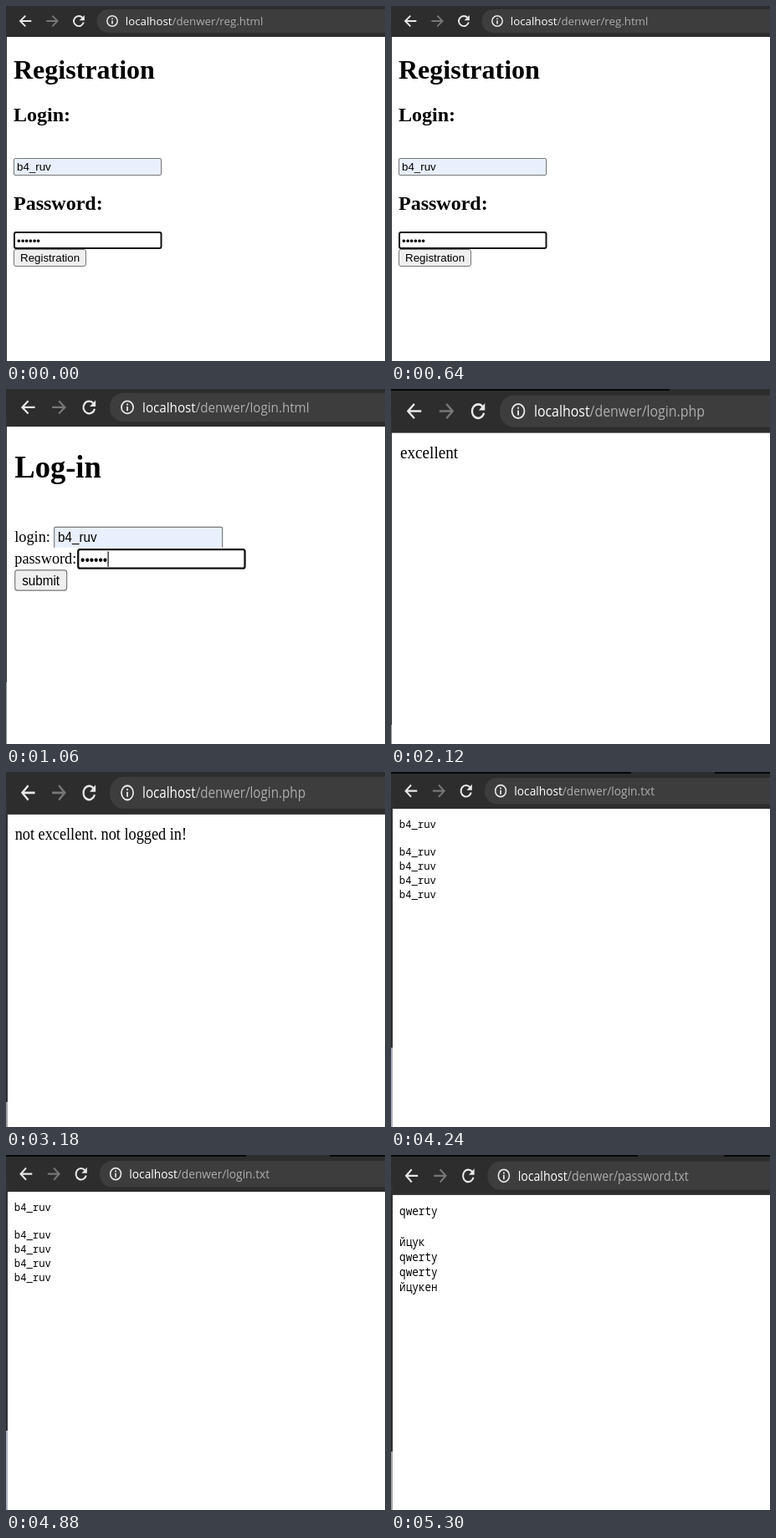
These frames come from a looping animation (453 by 425 pixels, 6.36 s). An HTML page:

```html
<!DOCTYPE html>
<html lang="en">
<head>
<meta charset="utf-8">
<title>Registration and log-in</title>
<style>
  html, body { margin: 0; width: 100%; height: 100%; overflow: hidden; background: #fff; }
  svg { display: block; width: 453px; height: 425px; }
  text { white-space: pre; }
  .url { font: 13.3px "Open Sans", sans-serif; fill: #adadad; }
  .host { fill: #fff; }
  .body { font: 16px "Liberation Serif", serif; }
  .h1 { font: bold 32px "Liberation Serif", serif; }
  .h2 { font: bold 24px "Liberation Serif", serif; }
  .ui { font: 13.33px "Liberation Sans", sans-serif; }
  .mono { font: 11.9px "Noto Sans Mono", monospace; }
  .icon { fill: none; stroke: #e8e8e8; stroke-width: 1.9; }
  .field { fill: #e8f0fe; stroke: #767676; }
  .focus { fill: #fff; stroke: #101010; stroke-width: 2; }
  .button { fill: #efefef; stroke: #767676; }
</style>
</head>
<body>
<svg id="stage" viewBox="0 0 453 425"></svg>
<script>
const HOLD = 1060;
const USER = "b4_ruv";
const DOTS = "••••••";
const BAR = "#2d2d2d";

const text = (kind, x, y, content) =>
  `<text class="${kind}" x="${x}" y="${y}">${content}</text>`;

const box = (kind, x, y, w, h, r) =>
  `<rect class="${kind}" x="${x}" y="${y}" width="${w}" height="${h}" rx="${r}"/>`;

const rect = (x, y, w, h, fill) =>
  `<rect x="${x}" y="${y}" width="${w}" height="${h}" fill="${fill}"/>`;

const lines = (list) =>
  list.map((line, i) => text("mono", 9.5, 57.2 + i * 15, line)).join("");

const toolbar = (path) => `
  ${rect(0, -10, 460, 47, BAR)}
  <rect x="108.5" y="4" width="400" height="28" rx="14" fill="#3d3d3d"/>
  <path class="icon" d="M30.3 18H17.3M23.3 11.7L17 18L23.3 24.3"/>
  <path class="icon" style="stroke:#777" d="M48.3 18H61.3M55.3 11.7L61.6 18L55.3 24.3"/>
  <path class="icon" d="M91.6 14.2A6 6 0 1 0 92.8 19.6"/>
  <path d="M93.8 11V17.2H87.6Z" fill="#e8e8e8"/>
  <circle class="icon" style="stroke-width:1.5" cx="127" cy="18" r="6.2"/>
  <path class="icon" style="stroke-width:1.6" d="M127 17.2V21.6M127 14.4V16"/>
  <text class="url" x="142.8" y="22.8"><tspan class="host">localhost</tspan>/denwer/${path}</text>`;

const registration =
  text("h1", 9, 87, "Registration") +
  text("h2", 9, 138, "Login:") +
  box("field", 9.5, 182.5, 176, 20, 1.5) +
  text("ui", 13, 197, USER) +
  text("h2", 9, 244, "Password:") +
  box("focus", 10, 271, 175.5, 19, 2) +
  text("ui", 13, 285.5, DOTS) +
  box("button", 9.5, 291.5, 86, 20, 2.5) +
  text("ui", 17, 306, "Registration");

const login =
  text("h1", 9, 87.2, "Log-in") +
  text("body", 9, 150.5, "login:") +
  `<path class="field" d="M50.5 156V137.5Q50.5 136 52 136H225Q226.5 136 226.5 137.5V156"/>` +
  text("ui", 54.3, 150.7, USER) +
  text("body", 9, 171.8, "password:") +
  box("focus", 75.5, 158, 174.5, 18.5, 2) +
  text("ui", 78, 172.3, DOTS) +
  rect(106.4, 160, 1, 15, "#000") +
  box("button", 9.4, 178.3, 54.2, 20, 2.5) +
  text("ui", 16.8, 193, "submit");

// edge: [width, end of the dark part, colour below it]; tab: [start, end] of the gap in the top strip
const screens = [
  { path: "reg.html", scale: [1, 1], dy: 0, edge: [1, 425, BAR], page: registration },
  { path: "login.html", scale: [1.142, 1.216], dy: 0, edge: [1, 351, "#8589a3"], page: login },
  { path: "login.php", scale: [1.197, 1.37], dy: 1.9, edge: [1, 402, "#8f8f8f"], tab: [333, 453],
    page: text("body", 9.2, 59.5, "excellent") },
  { path: "login.php", scale: [1.142, 1.37], dy: 0.2, edge: [2, 395, "#a0a0a0"],
    page: text("body", 9.4, 59.1, "not excellent. not logged in!") },
  { path: "login.txt", scale: [1.032, 1.125], dy: 2.4, edge: [2, 330, "#a9acc0"], tab: [287, 387],
    page: lines([USER, "", USER, USER, USER, USER]) },
  { path: "password.txt", scale: [1.062, 1.213], dy: 3, edge: [2, 355, "#a3a3a3"], tab: [295, 398],
    page: lines(["qwerty", "", "йцук", "qwerty", "qwerty", "йцукен"]) }
];

function drawScreen({ path, scale, dy, edge, tab, page }) {
  const [width, end, below] = edge;
  const strip = tab
    ? rect(0, 0, tab[0], 2, "#080808") + rect(tab[1], 0, 453 - tab[1], 2, "#080808")
    : "";
  return `<g opacity="0">
    ${rect(0, 0, 453, 425, "#fff")}
    <g transform="translate(0 ${dy}) scale(${scale})">${page}${toolbar(path)}</g>
    ${strip}${rect(0, 30, width, end - 30, "#303033")}${rect(0, end, width, 425 - end, below)}
  </g>`;
}

const stage = document.getElementById("stage");
stage.innerHTML = screens.map(drawScreen).join("");

const count = screens.length;
[...stage.children].forEach((screen, i) => {
  screen.animate(
    [
      { opacity: 1, offset: 0, easing: "step-end" },
      { opacity: 0, offset: 1 / count, easing: "step-end" },
      { opacity: 0, offset: 1 }
    ],
    { duration: HOLD * count, delay: HOLD * (i - count), iterations: Infinity }
  );
});
</script>
</body>
</html>
```
